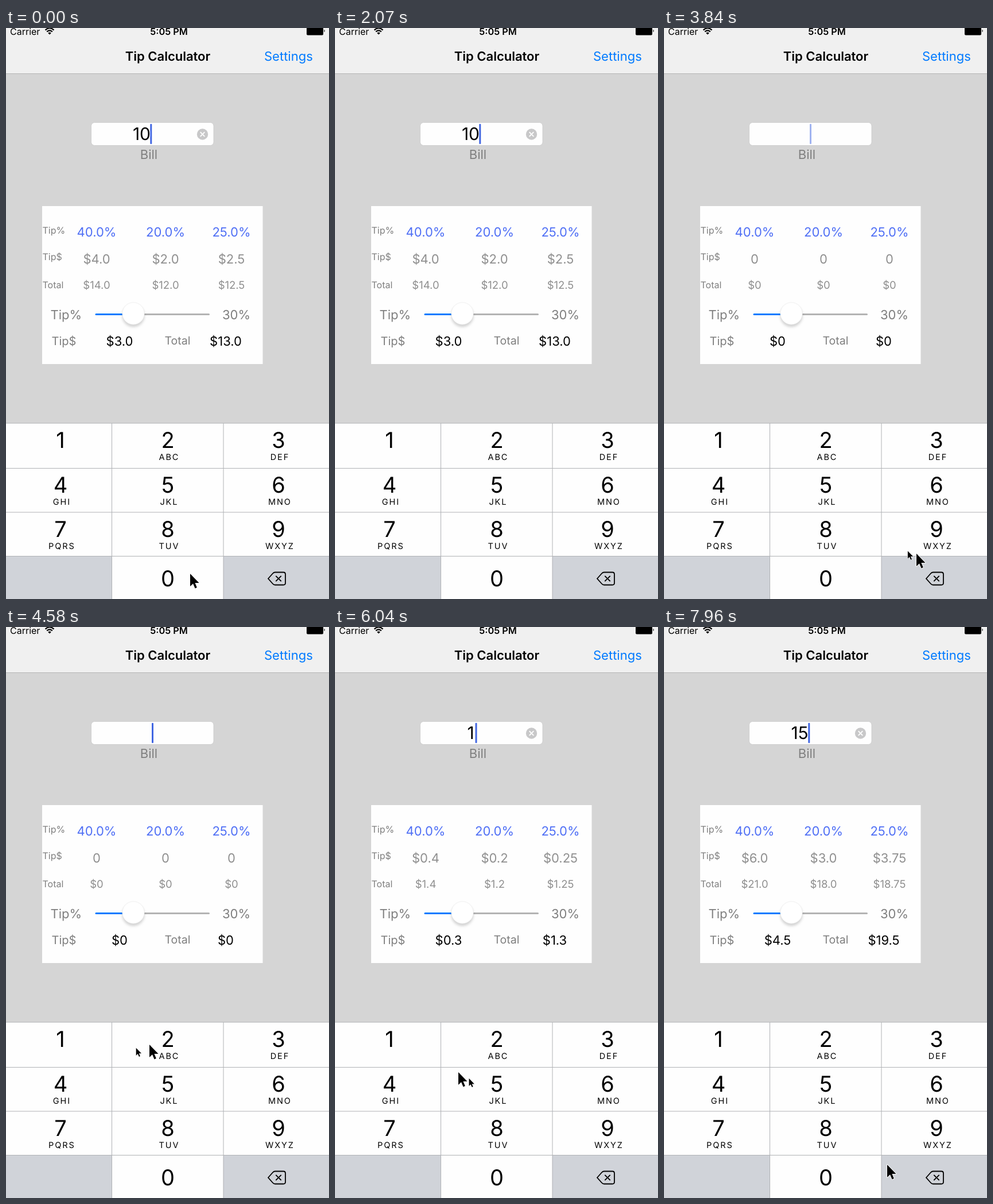
These frames come from a looping animation (563x994 px, 8000 ms). An HTML page:

```html
<!DOCTYPE html>
<html lang="en">
<head>
<meta charset="utf-8">
<title>Tip Calculator</title>
<style>
  html, body { margin: 0; width: 100%; height: 100%; overflow: hidden; background: #d5d5d5; }
  svg { display: block; width: 563px; height: 994px; }
  text { font-family: Inter, "Liberation Sans", sans-serif; font-size: 22px; text-rendering: geometricPrecision; }
  .mid { text-anchor: middle; }
  .gray { fill: #7f7f7f; }
  .soft { fill: #8f8f8f; }
  .tint { fill: #4f6ff5; }
  .small { font-size: 16px; }
  .sum { font-size: 18.5px; }
  .digit { font-size: 38px; }
  .letters { font-size: 14.5px; letter-spacing: 1.9px; }
  .thumb { filter: drop-shadow(0 4px 2px rgba(0, 0, 0, .17)); }
</style>
</head>
<body>
<svg viewBox="0 0 563 994">
  <defs>
    <path id="arrow" d="M0 0V16.2L3.7 12.7 6.3 18.7 8.7 17.7 6.2 11.8H11.4Z"
      stroke="#fff" stroke-width="1.4" paint-order="stroke" stroke-linejoin="round"/>
    <path id="eraser" d="M457 958.500L465 949.500Q466.800 947.500 469 947.500H483.500Q487 947.500 487 951V966Q487 969.500 483.500 969.500H469Q466.800 969.500 465 967.500Z"/>
  </defs>
  <rect width="563" height="994" fill="#d5d5d5"/>

  <rect width="563" height="79" fill="#f0f0f0"/>
  <rect y="79" width="563" height="1" fill="#b3b3b3"/>
  <text class="small" x="7" y="12">Carrier</text>
  <g fill="none" stroke="#000" stroke-width="2.2">
    <path d="M68.500 3.600Q76 -3.200 83.500 3.600M71.200 6.500Q76 2.200 80.800 6.500"/>
    <path d="M73.200 8.700Q76 6.400 78.800 8.700L76 11.600Z" fill="#000" stroke="none"/>
  </g>
  <text class="mid" x="284" y="12" style="font-size:16.3px;font-weight:600">5:05 PM</text>
  <rect x="524" y="-3" width="29" height="15.500" rx="2"/>
  <path d="M554.500 2.500Q557 5 554.500 7.500Z"/>
  <text class="mid" x="282" y="57" font-weight="600">Tip Calculator</text>
  <text x="450" y="57" fill="#007aff">Settings</text>

  <rect x="148.500" y="164.500" width="213.500" height="40" rx="6" fill="#fefefe" stroke="#cacaca" stroke-width=".8"/>
  <text id="bill" class="mid" x="236.500" y="195" style="font-size:30px"></text>
  <rect id="caret" y="167" width="3" height="35" rx="1" fill="#4267e2"/>
  <g id="clear">
    <circle cx="342.500" cy="185" r="9.700" fill="#c8c8c9"/>
    <path d="M338.700 181.200l7.600 7.600m0-7.600l-7.600 7.600" stroke="#fff" stroke-width="1.800"/>
  </g>
  <text class="mid gray" x="249" y="228">Bill</text>

  <rect x="63" y="310" width="384.500" height="275" fill="#fefefe"/>
  <text class="small gray" x="63.500" y="358">Tip%</text>
  <text class="small gray" x="63.500" y="404">Tip$</text>
  <text class="small gray" x="63.500" y="453">Total</text>
  <g id="columns"></g>
  <text class="gray" x="77.500" y="507">Tip%</text>
  <path d="M157 498.500H222" stroke="#007aff" stroke-width="3" stroke-linecap="round"/>
  <path d="M222 498.500H353.500" stroke="#b3b3b3" stroke-width="3" stroke-linecap="round"/>
  <circle class="thumb" cx="222" cy="497" r="19.200" fill="#fff" stroke="#e9e9e9" stroke-width=".7"/>
  <text class="mid gray" x="401.500" y="507">30%</text>
  <text class="gray" x="79.500" y="552" style="font-size:20px">Tip$</text>
  <text id="tip" class="mid" x="198" y="553"></text>
  <text class="gray" x="276.500" y="551" style="font-size:19.500px">Total</text>
  <text id="total" class="mid" x="383" y="553"></text>

  <g id="keys"></g>
  <g id="lines" stroke="#b0b2b5"></g>
  <use id="icon" href="#eraser" stroke="#000" stroke-width="1.800"/>
  <path id="cross" d="M470.300 953.800l9.400 9.400m0-9.400l-9.400 9.400" stroke-width="1.900" fill="none"/>

  <g id="pointer">
    <use id="near" href="#arrow"/>
    <use id="far" href="#arrow"/>
  </g>
</svg>
<script>
const LOOP = 8000, TICK = 147.5;
const KEY = '#fefefe', KEY_DARK = '#d0d3d9';
const $ = id => document.getElementById(id);

function add(parent, tag, attrs, text = '') {
  const el = document.createElementNS('http://www.w3.org/2000/svg', tag);
  for (const name in attrs) el.setAttribute(name, attrs[name]);
  el.textContent = text;
  return parent.appendChild(el);
}

// Three preset percentages
const columns = [[158, 40], [278, 20], [393, 25]].map(([x, pct]) => {
  const label = (cls, y, text) => add($('columns'), 'text', { class: 'mid ' + cls, x, y }, text);
  label('tint', 363, pct.toFixed(1) + '%');
  return { pct, tip: label('soft', 410), total: label('soft sum', 454) };
});

// Number pad
const colX = [0, 184.5, 379, 563], rowY = [688, 766.5, 843, 919.5, 994];
const digitX = [95, 282, 475], digitY = [731, 809, 886, 972];
const letters = ['', 'ABC', 'DEF', 'GHI', 'JKL', 'MNO', 'PQRS', 'TUV', 'WXYZ'];
const keys = [...'123456789', '', '0', 'del'].map((name, i) => {
  const c = i % 3, r = Math.floor(i / 3);
  const fill = name === '' || name === 'del' ? KEY_DARK : KEY;
  const rect = add($('keys'), 'rect', {
    x: colX[c], y: rowY[r], width: colX[c + 1] - colX[c], height: rowY[r + 1] - rowY[r], fill
  });
  if (name.length === 1) add($('keys'), 'text', { class: 'mid digit', x: digitX[c], y: digitY[r] }, name);
  if (letters[i]) add($('keys'), 'text', { class: 'mid letters', x: digitX[c] + 2.4, y: digitY[r] + 21 }, letters[i]);
  return { name, rect, fill };
});
rowY.slice(0, 4).forEach(y => add($('lines'), 'path', { d: `M0 ${y}H563` }));
colX.slice(1, 3).forEach(x => add($('lines'), 'path', { d: `M${x} 688V994` }));

// All times below are in ticks
const bills = [[0, '10'], [18, '1'], [22, ''], [38, '1'], [45, '15']];
const presses = { 22: 'del', 37: '1', 44: '5' };
const caretStarts = [-1, 18, 22, 38, 45];
const blink = [1, 1, 1, 1, .5, 0, 0];
const caretX = [254, 244.5, 251.3];
const path = [
  [0, 321, 950], [2, 321, 950], [4, 328, 944], [6, 305, 890], [8, 243, 805], [9, 250, 786],
  [11, 207, 760], [13, 310, 775], [16, 455, 900], [18, 508, 965], [19, 498, 947], [24, 498, 947],
  [26, 440, 915], [29, 276, 824], [30, 268, 770], [31, 250, 727], [32, 172, 726], [34, 126, 733],
  [37, 123, 730], [38, 92, 729], [39, 122, 735], [41, 215, 775], [43, 298, 802], [45, 304, 806],
  [46, 307, 803], [51, 307, 803], [52, 328, 846], [53, 370, 912], [54, 389, 936]
];

function at(t) {
  const i = path.findIndex(p => p[0] > t);
  if (i < 0) return path[path.length - 1].slice(1);
  const [t0, x0, y0] = path[i - 1], [t1, x1, y1] = path[i];
  const k = (t - t0) / (t1 - t0);
  return [x0 + (x1 - x0) * k, y0 + (y1 - y0) * k];
}

const latest = (list, tick) => list.filter(v => v <= tick).pop();
function money(v) {
  const n = Number(v.toFixed(2));
  return '$' + (Number.isInteger(n) ? n.toFixed(1) : n);
}
const show = (el, on) => el.setAttribute('visibility', on ? 'visible' : 'hidden');

function draw(tick) {
  const bill = bills.filter(b => b[0] <= tick).pop()[1];
  const n = Number(bill);
  $('bill').textContent = bill;
  show($('clear'), bill);
  $('caret').setAttribute('x', caretX[bill.length]);
  $('caret').setAttribute('opacity', blink[(tick - latest(caretStarts, tick)) % blink.length]);

  for (const c of columns) {
    c.tip.textContent = bill ? money(n * c.pct / 100) : '0';
    c.total.textContent = bill ? money(n * (1 + c.pct / 100)) : '$0';
  }
  $('tip').textContent = bill ? money(n * .3) : '$0';
  $('total').textContent = bill ? money(n * 1.3) : '$0';

  const down = presses[tick];
  for (const k of keys) {
    const flipped = k.fill === KEY ? KEY_DARK : KEY;
    k.rect.setAttribute('fill', down && k.name === down ? flipped : k.fill);
  }
  const erasing = down === 'del';
  $('icon').setAttribute('fill', erasing ? '#000' : 'none');
  $('cross').setAttribute('stroke', erasing ? '#fff' : '#000');

  // The small arrow runs slightly ahead of the large one
  show($('pointer'), tick < 14 || tick > 16);
  const [x, y] = at(tick), [sx, sy] = at(tick + .35);
  $('far').setAttribute('transform', `translate(${x} ${y}) scale(1.36)`);
  $('near').setAttribute('transform', `translate(${sx + 4} ${sy + 6}) scale(.82)`);
}

let last = -1;
function frame(now) {
  const tick = Math.floor((now % LOOP + 10) / TICK);
  if (tick !== last) draw(last = tick);
  requestAnimationFrame(frame);
}
draw(0);
requestAnimationFrame(frame);
</script>
</body>
</html>
```
